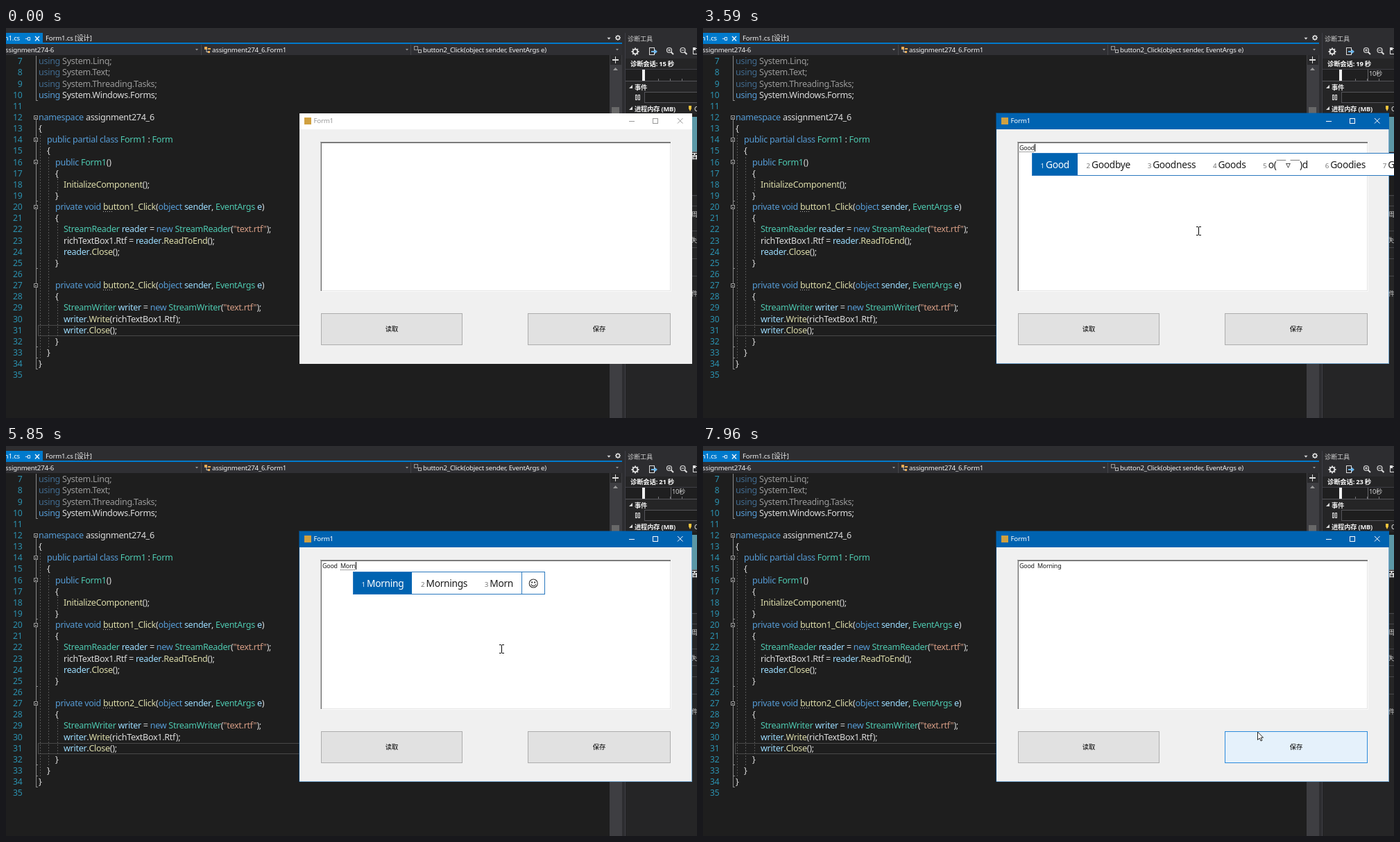
Recreate the animation shown at these times as an HTML page with a canvas. Size 996x562 px, loop 8000 ms.

```html
<!DOCTYPE html>
<html lang="zh">
<head>
<meta charset="utf-8">
<style>
html, body { margin: 0; width: 100%; height: 100%; overflow: hidden; background: #1e1e1e; }
canvas { display: block; }
</style>
</head>
<body>
<canvas id="stage" width="996" height="562"></canvas>
<script>
const ctx = document.getElementById('stage').getContext('2d');
const LOOP = 8000;
const FAMILY = '"Noto Sans", "Noto Sans CJK SC", "Noto Sans CJK", sans-serif';
const ACCENT = '#0063b1';
const INK = {
  k: '#569cd6', p: '#dcdcdc', c: '#4ec9b0', m: '#dcdcaa', v: '#9cdcfe', s: '#d69d85',
  K: '#416a8e', P: '#9a9a9a'
};

// Each line: indent level, then alternating colour key and text.
const CLICK_ARGS = 'p|(|k|object |v|sender|p|, |c|EventArgs |v|e|p|)';
const CODE = [
  [0, 'K|using |P|System.Linq;'],
  [0, 'K|using |P|System.Text;'],
  [0, 'K|using |P|System.Threading.Tasks;'],
  [0, 'k|using |p|System.Windows.Forms;'],
  [0, ''],
  [0, 'k|namespace |p|assignment274_6'],
  [0, 'p|{'],
  [1, 'k|public partial class |c|Form1 |p|: |c|Form'],
  [1, 'p|{'],
  [2, 'k|public |c|Form1|p|()'],
  [2, 'p|{'],
  [3, 'm|InitializeComponent|p|();'],
  [2, 'p|}'],
  [2, 'k|private void |m|button1_Click|' + CLICK_ARGS],
  [2, 'p|{'],
  [3, 'c|StreamReader |v|reader |p|= |k|new |c|StreamReader|p|(|s|"text.rtf"|p|);'],
  [3, 'p|richTextBox1.Rtf = |v|reader|p|.|m|ReadToEnd|p|();'],
  [3, 'v|reader|p|.|m|Close|p|();'],
  [2, 'p|}'],
  [0, ''],
  [2, 'k|private void |m|button2_Click|' + CLICK_ARGS],
  [2, 'p|{'],
  [3, 'c|StreamWriter |v|writer |p|= |k|new |c|StreamWriter|p|(|s|"text.rtf"|p|);'],
  [3, 'v|writer|p|.|m|Write|p|(richTextBox1.Rtf);'],
  [3, 'v|writer|p|.|m|Close|p|();'],
  [2, 'p|}'],
  [1, 'p|}'],
  [0, 'p|}'],
  [0, '']
];

// [time, committed text, text being composed, new candidate list]
const EDITS = [
  [0, '', '', []],
  [2510, '', 'G'],
  [2580, '', 'G', ['G']],
  [2810, '', 'Go'],
  [2890, '', 'Go', ['Go', 'Good', 'Going', 'Got', 'Gone', 'Goes', 'Goal', 'Gold']],
  [2970, '', 'Goo', ['Good', 'Goods', 'Goodbye', 'Goodness', 'Goose', 'Goodies', 'Goodwill']],
  [3520, '', 'Good'],
  [3590, '', 'Good', ['Good', 'Goodbye', 'Goodness', 'Goods', 'o(￣▿￣)d', 'Goodies', 'Goodwill']],
  [3900, 'Good', '', []],
  [4220, 'Good ', ''],
  [4920, 'Good ', 'M', ['M']],
  [5070, 'Good ', 'Mo'],
  [5150, 'Good ', 'Mo', ['Model', 'Money', 'Months', 'More', '無', 'Most', 'Mostly']],
  [5300, 'Good ', 'Mor'],
  [5390, 'Good ', 'Mor', ['More', 'Morning', 'Moral', 'Moreover', 'Mortgage', 'Mortal', 'Mornings']],
  [5850, 'Good ', 'Morn', ['Morning', 'Mornings', 'Morn']],
  [6020, 'Good ', 'Morni', ['Morning', 'Mornings']],
  [6170, 'Good ', 'Mornin', ['Morning', 'Mornings']],
  [6320, 'Good ', 'Morning'],
  [6400, 'Good ', 'Morning', ['Morning', 'Mornings']],
  [6950, 'Good Morning', '', []]
];
const FOCUS_AT = 640, BLINK = 546;
const SECOND_TICKS = [260, 1270, 2280, 3290, 4300, 5300, 6320, 7180];

function setFont(size, weight = 400) {
  ctx.font = `${weight} ${size}px ${FAMILY}`;
  ctx.letterSpacing = `${-0.0226 * size}px`;
}
function text(str, x, y, size, color, { weight = 400, align = 'left' } = {}) {
  setFont(size, weight);
  ctx.textAlign = align;
  ctx.fillStyle = color;
  ctx.fillText(str, x, y);
}
function textWidth(str, size) {
  setFont(size);
  return ctx.measureText(str).width;
}
function rect(x, y, w, h, color) {
  ctx.fillStyle = color;
  ctx.fillRect(x, y, w, h);
}
function frame(x, y, w, h, color) {
  ctx.strokeStyle = color;
  ctx.lineWidth = 1;
  ctx.strokeRect(x + 0.5, y + 0.5, w - 1, h - 1);
}
function path(points, color, { width = 1, fill = false, close = false } = {}) {
  ctx.beginPath();
  points.forEach(([x, y]) => ctx.lineTo(x, y));
  if (close || fill) ctx.closePath();
  ctx.lineWidth = width;
  ctx.strokeStyle = ctx.fillStyle = color;
  fill ? ctx.fill() : ctx.stroke();
}
function circle(x, y, r, color, width = 1) {
  ctx.beginPath();
  ctx.arc(x, y, r, 0, Math.PI * 2);
  ctx.strokeStyle = color;
  ctx.lineWidth = width;
  ctx.stroke();
}
function caretDown(x, y, color = '#b5b5b5', s = 2.5) {
  path([[x - s, y - s / 2], [x + s, y - s / 2], [x, y + s / 2 + 0.5]], color, { fill: true });
}
function gear(x, y, r, color) {
  circle(x, y, r * 0.62, color, r * 0.35);
  for (let i = 0; i < 8; i++) {
    const a = i * Math.PI / 4, dx = Math.cos(a), dy = Math.sin(a);
    path([[x + dx * r * 0.7, y + dy * r * 0.7], [x + dx * r, y + dy * r]], color, { width: r * 0.35 });
  }
}

function drawTabs() {
  rect(0, 0, 996, 39, '#2d2d30');
  rect(0, 7, 53, 15, '#007acc');
  rect(0, 21, 888, 2, '#007acc');
  text('m1.cs', 20, 18, 9.7, '#fff', { align: 'right' });
  path([[28, 15.5], [31, 15.5]], '#d0e6f5');
  frame(31, 13, 4, 5, '#d0e6f5');
  path([[42, 12], [48, 18.5]], '#fff', { width: 1.2 });
  path([[48, 12], [42, 18.5]], '#fff', { width: 1.2 });
  text('Form1.cs [设计]', 57, 17.5, 9.7, '#f1f1f1');
  caretDown(869, 15, '#d8d8d8');
  gear(882, 14, 4, '#d8d8d8');

  rect(0, 23, 888, 16, '#2f2f33');
  text('ssignment274-6', 69, 34.5, 9.7, '#f1f1f1', { align: 'right' });
  text('assignment274_6.Form1', 297, 34.5, 9.7, '#f1f1f1');
  text('button2_Click(object sender, EventArgs e)', 601, 34.5, 9.7, '#f1f1f1');
  [275, 578, 881].forEach(x => caretDown(x, 31, '#999', 2));
  [281, 583].forEach(x => rect(x, 24, 1, 15, '#46464a'));
  rect(286, 27, 4, 4, '#e8ab53');
  rect(291, 29, 4, 2, '#e8ab53');
  rect(291, 33, 3, 3, '#e8ab53');
  path([[289, 30], [289, 34.5], [292, 34.5]], '#c8c8c8');
  frame(588, 26, 6, 6, '#999');
  frame(594, 31, 5, 5, '#b5b5b5');
}

function drawCode() {
  rect(0, 39, 870, 523, '#1e1e1e');
  frame(46, 428, 824, 16, '#484848');

  rect(43, 40, 1, 64, '#8a8a8a');
  rect(43, 129, 1, 363, '#8a8a8a');
  [104, 249, 346, 459, 475, 491].forEach(y => rect(43, y, 3, 1, '#8a8a8a'));
  [129, 161, 193, 258, 371].forEach(y => {
    rect(40, y - 3, 6, 6, '#1e1e1e');
    frame(40, y - 3, 6, 6, '#999');
    rect(42, y, 2, 1, '#ccc');
  });
  ctx.setLineDash([2, 2]);
  [[49, 154, 478], [61, 186, 462], [74, 217, 235], [74, 282, 332], [74, 394, 445]]
    .forEach(([x, a, b]) => path([[x + 0.5, a], [x + 0.5, b]], '#565656'));
  ctx.setLineDash([]);

  CODE.forEach(([indent, line], i) => {
    const y = 52.3 + i * 16.14;
    text(String(i + 7), 23.5, y, 12.2, '#2b91af', { align: 'right' });
    let x = 47 + indent * 12;
    const parts = line.split('|');
    for (let j = 0; j + 1 < parts.length; j += 2) {
      text(parts[j + 1], x, y, 12.55, INK[parts[j]]);
      x += ctx.measureText(parts[j + 1]).width;
    }
  });
  [264, 377].forEach(y => {
    for (let x = 140; x < 154; x += 3) rect(x, y, 1, 1, '#aaa');
  });

  rect(870, 39, 18, 523, '#3e3e42');
  rect(871, 39, 16, 14, '#2a2a2c');
  rect(874, 45, 9, 2, '#ddd');
  rect(878, 41, 1, 10, '#ddd');
  path([[875, 61], [882, 61], [878.5, 57]], '#999', { fill: true });
  rect(873, 114, 11, 60, '#686868');
}

function section(label, y) {
  path([[898, y + 2], [903, y + 2], [903, y - 3]], '#ddd', { fill: true });
  text(label, 906, y + 3.5, 9.3, '#f1f1f1', { weight: 700 });
}
function magnifier(x, y, plus) {
  circle(x, y, 3.5, '#ddd', 1.2);
  path([[x + 2.5, y + 2.5], [x + 6, y + 6]], '#ddd', { width: 2 });
  path([[x - 2, y], [x + 2, y]], '#ddd');
  if (plus) path([[x, y - 2], [x, y + 2]], '#ddd');
}
function drawDiagnostics(t) {
  const seconds = 15 + SECOND_TICKS.filter(at => t >= at).length;
  rect(888, 0, 5, 562, '#2d2d30');
  rect(893, 7, 103, 555, '#252526');
  rect(893, 7, 103, 17, '#2d2d30');
  rect(892, 7, 1, 555, '#3f3f46');
  text('诊断工具', 896, 18.5, 9.2, '#cfcfcf');
  rect(893, 24, 103, 20, '#2d2d30');
  gear(907, 34, 5.5, '#ddd');
  frame(927, 28, 8, 11, '#ddd');
  path([[930, 34], [937, 34]], '#6cb5ea', { width: 2 });
  path([[935, 30.5], [939, 34], [935, 37.5]], '#6cb5ea', { fill: true });
  magnifier(956, 32, true);
  magnifier(975.5, 32, false);
  frame(990, 29, 8, 9, '#ddd');
  rect(990, 28, 4, 4, '#ddd');
  text(`诊断会话: ${seconds} 秒`, 900, 55, 9.4, '#fff', { weight: 700 });

  rect(893, 60, 103, 17, '#1f1f20');
  rect(893, 59, 103, 1, '#3f3f46');
  rect(893, 76, 103, 1, '#55555a');
  [940, 957, 974].forEach(x => rect(x, 73, 1, 3, '#77777a'));
  if (t >= 2580) {
    rect(958, 60, 1, 17, '#66666a');
    text('10秒', 960, 69, 9.2, '#d5d5d5');
  }
  rect(917, 60, 4, 16, '#f1f1f1');

  section('事件', 85);
  frame(907, 96, 3, 8, '#ddd');
  frame(911, 96, 3, 8, '#ddd');
  rect(920, 92, 76, 16, '#1e1e1e');
  frame(920, 92, 80, 16, '#55555a');
  section('进程内存 (MB)', 116);
  path([[984, 112], [988, 112], [988, 116], [986, 120], [984, 116]], '#f0c43c', { fill: true });
  text('C', 992, 119.5, 9.4, '#f1f1f1');

  rect(920, 124, 76, 54, '#1e1e1e');
  rect(920, 128, 76, 50, '#5b97a6');
  rect(893, 178, 103, 1, '#77777a');
  text('百分', 988, 187.5, 9.3, '#fff', { weight: 700 });
  rect(920, 192, 76, 48, '#1e1e1e');
  [241, 256, 292, 316, 332, 357].forEach(y => rect(893, y, 103, 1, '#46464a'));
  text('周率', 988, 272, 9.2, '#ccc');
  text('失', 987, 308.5, 9.2, '#ccc');
  text('件', 988, 385.5, 9.2, '#ccc');
}

function drawButton(x, w, label, hover) {
  rect(x, 411, w, 46, hover ? '#e5f1fb' : '#e1e1e1');
  frame(x, 411, w, 46, hover ? '#2b8bdc' : '#adadad');
  text(label, x + w / 2, 437.3, 9.4, '#000', { align: 'center' });
}
function drawForm(active, hover) {
  rect(423, 123, 566, 361, '#f0f0f0');
  rect(423, 123, 566, 23, active ? ACCENT : '#fff');
  if (active) frame(422, 122, 567, 362, 'rgba(0, 99, 177, .5)');
  rect(430, 129, 10, 10, '#d0a040');
  const ink = active ? '#fff' : '#999';
  text('Form1', 443.5, 137.3, 9.7, ink);
  rect(898, 134, 8, 1, ink);
  frame(932, 130, 8, 8, ink);
  path([[968, 130], [975.5, 137.5]], ink);
  path([[975.5, 130], [968, 137.5]], ink);

  rect(453, 164, 506, 216, '#fafafa');
  rect(453, 165, 1, 214, '#c4c4c4');
  rect(453, 164, 505, 1, '#8a8a8a');
  rect(454, 165, 504, 214, '#6d6d6d');
  rect(455, 166, 503, 213, '#fff');
  rect(455, 378, 503, 1, '#e6e6e6');
  rect(957, 166, 1, 213, '#e6e6e6');
  drawButton(454, 204, '读取', false);
  drawButton(752, 206, '保存', hover);
}

const TYPE_SIZE = 8.9, WORD_X = [456, 482];
function caretAt(str) {
  const words = str.split(' ');
  const last = words.length - 1;
  return WORD_X[last] + textWidth(words[last], TYPE_SIZE);
}
function drawTyping(t) {
  const past = EDITS.filter(([at]) => t >= at);
  const [at, done, composing] = past[past.length - 1];
  const full = done + composing;
  full.split(' ').forEach((word, i) => text(word, WORD_X[i], 176, TYPE_SIZE, '#1c1c1c'));
  const caret = caretAt(full);
  if (composing) {
    for (let x = WORD_X[done ? 1 : 0]; x < caret - 1; x += 2) rect(x, 178, 1, 1, '#444');
  }
  const since = Math.max(at, FOCUS_AT);
  const blinkOn = Math.floor((t - since) / BLINK) % 2 === 0;
  if (t >= FOCUS_AT && (composing || blinkOn)) rect(Math.round(caret), 167, 1, 11, '#000');

  const [, before, partial, words] = past.filter(edit => edit[3]).pop();
  if (words.length) drawCandidates(Math.round(caretAt(before + partial) - 3.5), before ? 181 : 180, words);
}

function smiley(x, y) {
  circle(x, y, 6, '#333', 1.1);
  rect(x - 3, y - 2.5, 2, 2, '#333');
  rect(x + 1, y - 2.5, 2, 2, '#333');
  ctx.beginPath();
  ctx.arc(x, y + 0.3, 3.4, 0.25, Math.PI - 0.25);
  ctx.stroke();
}
function drawCandidates(left, top, words) {
  const size = 13.75, base = top + 21.6, numbered = words.length > 1;
  const lead = numbered ? 20 : 12;
  const widths = words.map(word => (word === '無' ? 18 : textWidth(word, size)) + lead + 12.2);
  const total = widths.reduce((sum, w) => sum + w, 34);
  rect(left, top, total, 33, '#fff');
  let x = left;
  words.forEach((word, i) => {
    const chosen = i === 0;
    if (chosen) rect(x, top, Math.round(widths[i]), 33, ACCENT);
    if (numbered) text(String(i + 1), x + 12.5, base, 9.8, chosen ? '#dcebf7' : '#777');
    if (word === '無') {
      rect(x + lead + 1, top + 11, 15, 15, '#e8571c');
      frame(x + lead + 2, top + 12, 13, 13, '#f39a6c');
      text(word, x + lead + 8.5, base + 0.8, 9.5, '#fff', { weight: 700, align: 'center' });
    } else {
      text(word, x + lead, base, size, chosen ? '#fff' : '#1c1c1c');
    }
    x += widths[i];
  });
  rect(Math.round(x), top, 1, 33, '#2a78be');
  smiley(x + 17, top + 17);
  frame(left, top, Math.round(total), 33, '#2a78be');
}

function drawArrow(x, y) {
  const shape = [[0, 0], [0, 11.5], [2.7, 9], [4.6, 13], [6.4, 12.2], [4.6, 8.3], [8, 8.2]]
    .map(([dx, dy]) => [x + dx, y + dy]);
  path(shape, '#fff', { fill: true });
  path(shape, '#222', { close: true });
}
function drawBeam(x, y) {
  x = Math.round(x);
  y = Math.round(y);
  rect(x, y - 5, 1, 11, '#000');
  [-6, 6].forEach(dy => {
    rect(x - 3, y + dy, 3, 1, '#000');
    rect(x + 1, y + dy, 3, 1, '#000');
  });
}
function steppedProgress(t, start, end, count) {
  const step = Math.floor((t - start) / (end - start) * (count - 1) + 1e-6) + 1;
  return Math.min(1, Math.max(0, step / count));
}
const mix = (a, b, k) => a + (b - a) * k;

function pointer(t) {
  if (t < 180) return null;
  if (t < 7500) {
    const k = steppedProgress(t, 180, 340, 3);
    return { x: mix(730, 714, k), y: mix(676, 292, k) };
  }
  const k = steppedProgress(t, 7500, 7960, 7);
  const eased = k * k * (3 - 2 * k);
  return { x: mix(714, 799.5, eased), y: mix(292, 412, eased) };
}
function drawPointer(t, at) {
  if (!at || (t >= 4220 && t < 4920)) return;
  if (t >= FOCUS_AT && t < 810) {
    circle(713, 291, 6.5, '#2f8fd8', 3);
  } else if (at.y > 166 && at.y < 379) {
    drawBeam(at.x, at.y);
  } else {
    drawArrow(at.x, at.y);
  }
}

function draw(now) {
  const t = now % LOOP;
  const at = pointer(t);
  const hover = !!at && at.y >= 411 && at.y < 457 && at.x >= 752 && at.x < 958;
  drawTabs();
  drawCode();
  drawDiagnostics(t);
  drawForm(t >= FOCUS_AT, hover);
  drawTyping(t);
  drawPointer(t, at);
}

const start = performance.now();
function tick() {
  draw(performance.now() - start);
  requestAnimationFrame(tick);
}
tick();
</script>
</body>
</html>
```
